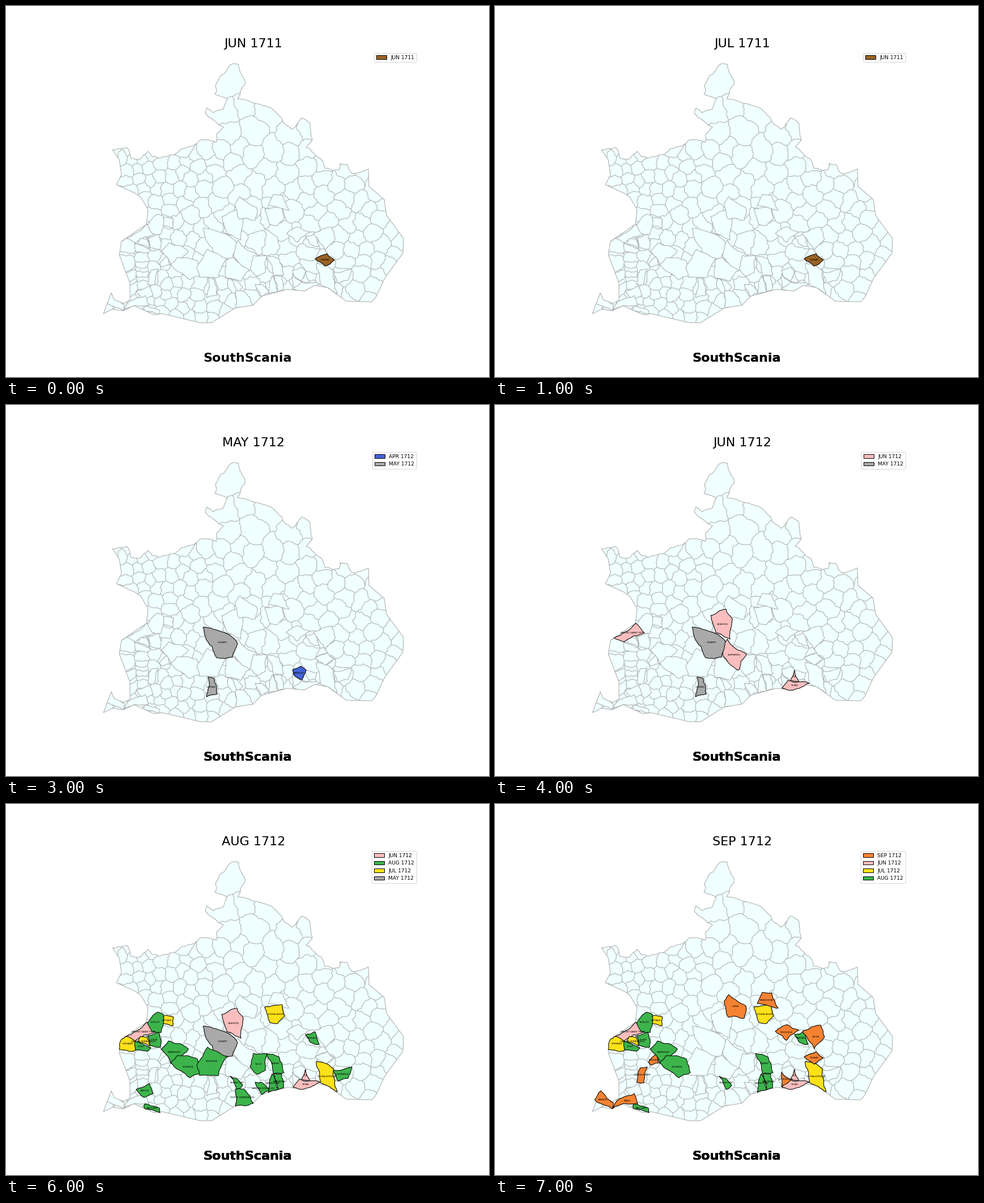
Write a matplotlib script that moves like this. It is 853 px wide and 656 px high and loops after 8 s.

```python
import math
import random
import matplotlib.pyplot as plt
from matplotlib.animation import FuncAnimation
from matplotlib.collections import LineCollection
from matplotlib.patches import Patch, Polygon

W, H, DPI = 853, 656, 128
PX = 72 / DPI  # one pixel in points
LAND, BORDER = "#f0ffff", "#a9a9a9"
COLORS = {"JUN 1711": "#9a6324", "APR 1712": "#4363d8", "MAY 1712": "#a9a9a9",
          "JUN 1712": "#fabebe", "JUL 1712": "#ffe119", "AUG 1712": "#3cb44b",
          "SEP 1712": "#f58231"}
# Title and legend months of every step
STEPS = [("JUN 1711", ["JUN 1711"]),
         ("JUL 1711", ["JUN 1711"]),
         ("APR 1712", ["APR 1712"]),
         ("MAY 1712", ["APR 1712", "MAY 1712"]),
         ("JUN 1712", ["JUN 1712", "MAY 1712"]),
         ("JUL 1712", ["JUN 1712", "JUL 1712", "MAY 1712"]),
         ("AUG 1712", ["JUN 1712", "AUG 1712", "JUL 1712", "MAY 1712"]),
         ("SEP 1712", ["SEP 1712", "JUN 1712", "JUL 1712", "AUG 1712"])]

plt.rcParams["font.family"] = "DejaVu Sans"
random.seed(17)

fig = plt.figure(figsize=(W / DPI, H / DPI), dpi=DPI, facecolor="white")
ax = fig.add_axes([0, 0, 1, 1])
ax.set_xlim(0, W)
ax.set_ylim(H, 0)
ax.axis("off")


def points(flat):
    return [complex(x, y) for x, y in zip(flat[::2], flat[1::2])]


def xy(path):
    return [(p.real, p.imag) for p in path]


def rough(a, b, amp):
    """Jagged path from a to b, without its start."""
    if abs(b - a) < 6:
        return [b]
    mid = (a + b) / 2 + 1j * (b - a) * random.uniform(-amp, amp)
    return rough(a, mid, amp) + rough(mid, b, amp)


def rough_path(path, amp):
    out = [path[0]]
    for a, b in zip(path, path[1:]):
        out += rough(a, b, amp)
    return out


def draw(path, fc, ec, z):
    return ax.add_patch(Polygon(xy(path), fc=fc, ec=ec, lw=PX, zorder=z))


# Province outline: jagged land border in the north, plain coast elsewhere
INLAND = [188, 254, 213, 250, 220, 269, 236, 271, 251, 257, 258, 266, 284, 266,
          311, 252, 341, 238, 371, 241, 372, 226, 384, 214, 364, 200, 352, 190,
          355, 180, 366, 189, 384, 182, 391, 165, 369, 156, 379, 123, 398, 103,
          411, 103, 422, 139, 409, 164, 435, 171, 465, 179, 490, 206, 505, 218,
          522, 198, 536, 206, 541, 237, 530, 250, 556, 270, 563, 287, 588, 290,
          590, 279, 602, 280, 611, 296, 640, 288]
COAST = [641, 319, 668, 342, 672, 370, 702, 411, 701, 437, 669, 481, 653, 515,
         646, 523, 601, 522, 568, 498, 545, 494, 527, 504, 497, 501, 452, 513,
         436, 529, 405, 534, 363, 560, 343, 560, 276, 544, 262, 546, 226, 530,
         207, 539, 188, 536, 172, 544, 186, 507, 191, 519, 208, 526, 219, 520,
         219, 490, 200, 440, 204, 416, 248, 386, 251, 360, 238, 338, 228, 331,
         195, 316, 204, 298, 200, 272]
outline = rough_path(points(INLAND), 0.12) + points(COAST)
land = draw(outline, LAND, "none", 0)
draw(outline, "none", BORDER, 3)

areas = []
grounds = []
sites = []


def inner_point(path):
    """Middle of the widest stretch at half the height."""
    ys = [p.imag for p in path]
    y = (min(ys) + max(ys)) / 2 + 0.01
    cuts = sorted(a.real + (b.real - a.real) * (y - a.imag) / (b.imag - a.imag)
                  for a, b in zip(path, path[1:] + path[:1])
                  if (a.imag < y) != (b.imag < y))
    left, right = max(zip(cuts[::2], cuts[1::2]), key=lambda c: c[1] - c[0])
    return complex((left + right) / 2, y)


def area(name, month, first, last, *corners):
    """A parish highlighted from the first to the last step."""
    path = points(corners)
    spot = inner_point(path)
    edge = rough_path(path + path[:1], 0.1)
    ground = draw(edge, LAND, BORDER, 2)
    ground.set_clip_path(land)
    grounds.append(ground)
    if spot not in sites:
        sites.append(spot)
    label = ax.text(spot.real, spot.imag, name, size=4.17 * PX,
                    ha="center", va="center", zorder=6)
    areas.append((first, last, draw(edge, COLORS[month], "black", 5), label))


OVRABY = [546, 447, 567, 438, 580, 449, 563, 460]
area("ÖVRABY", "JUN 1711", 0, 1, *OVRABY)
area("BJÄRESJÖ", "APR 1712", 2, 3, 506, 468, 521, 462, 530, 469, 523, 486, 508, 477)
area("GENARP", "MAY 1712", 3, 6, 348, 393, 394, 406, 409, 422, 400, 446, 372, 447,
     352, 410)
area("GRÖNBY", "MAY 1712", 3, 4, 357, 481, 367, 483, 373, 511, 354, 516)
area("MALMÖ SANKT PETRI", "JUN 1712", 4, 7, 210, 412, 248, 386, 263, 403, 228, 419)
area("VEBERÖD", "JUN 1712", 4, 6, 381, 372, 408, 361, 419, 378, 415, 414, 390, 402)
area("SLIMMINGE", "JUN 1712", 4, 4, 410, 414, 424, 430, 444, 440, 430, 469, 402, 442)
area("ÖJA", "JUN 1712", 4, 7, 529, 469, 537, 490, 522, 488)
area("YSTAD", "JUN 1712", 4, 7, 507, 501, 517, 487, 555, 492, 527, 504)
area("LIMHAMN", "JUL 1712", 5, 7, 200, 434, 204, 416, 211, 411, 228, 419, 228, 436)
area("VÄSTRA SKRÄVLINGE", "JUL 1712", 5, 7, 233, 421, 237, 411, 249, 412, 253, 428)
area("TOTTARP", "JUL 1712", 5, 7, 271, 384, 280, 374, 296, 377, 295, 392)
area("SÖDRA ÅSUM", "JUL 1712", 5, 7, 457, 359, 488, 355, 492, 375, 480, 388, 466, 386)
area("SKURUP", "JUL 1712", 5, 5, 389, 450, 402, 445, 429, 467, 415, 487, 390, 482)
area("STORA KÖPINGE", "JUL 1712", 5, 7, 548, 455, 578, 468, 585, 509, 556, 493)
area("BURLÖV", "AUG 1712", 6, 7, 250, 388, 268, 368, 278, 372, 274, 404, 258, 402)
area("HUSIE", "AUG 1712", 6, 7, 250, 410, 270, 404, 273, 430, 254, 427)
area("FOSIE", "AUG 1712", 6, 7, 227, 420, 256, 431, 250, 437, 229, 435)
area("SKABERSJÖ", "AUG 1712", 6, 7, 274, 433, 287, 419, 322, 433, 312, 444, 291, 459)
area("SVEDALA", "AUG 1712", 6, 7, 291, 457, 302, 445, 338, 451, 345, 475, 325, 484)
area("BÖRRINGE", "AUG 1712", 6, 6, 337, 462, 356, 430, 391, 446, 375, 480, 342, 480)
area("VILLIE", "AUG 1712", 6, 6, 431, 465, 437, 441, 462, 443, 458, 471, 444, 478)
area("SKÅRBY", "AUG 1712", 6, 7, 460, 441, 482, 447, 491, 475, 472, 477)
area("BALKÅKRA", "AUG 1712", 6, 7, 473, 477, 486, 477, 490, 502, 480, 505)
area("SNÅRESTAD", "AUG 1712", 6, 7, 470, 477, 480, 505, 463, 510)
area("VÄSTRA NÖBBELÖV", "AUG 1712", 6, 6, 440, 492, 451, 492, 465, 506, 452, 514)
area("SVENSTORP", "AUG 1712", 6, 7, 396, 481, 408, 486, 418, 497, 409, 505)
area("ÖSTRA VEMMENHÖG", "AUG 1712", 6, 6, 405, 504, 420, 504, 437, 529, 405, 534)
area("HÄSLÖV", "AUG 1712", 6, 6, 230, 505, 253, 494, 260, 512, 244, 519)
area("MAGLARP", "AUG 1712", 6, 7, 245, 530, 271, 538, 272, 546, 244, 538)
area("RAMSÅSA", "AUG 1712", 6, 7, 529, 408, 546, 403, 553, 425, 537, 421)
area("GLEMMINGE", "AUG 1712", 6, 6, 578, 471, 611, 465, 604, 485, 586, 490)
area("VOMB", "SEP 1712", 7, 7, 405, 348, 413, 337, 443, 357, 440, 379, 412, 377)
area("BRANDSTAD", "SEP 1712", 7, 7, 463, 353, 472, 333, 489, 334, 500, 361, 488, 358)
area("RÖDDINGE", "SEP 1712", 7, 7, 495, 402, 516, 390, 537, 400, 515, 418)
area("TRYDE", "SEP 1712", 7, 7, 543, 402, 575, 391, 582, 412, 564, 433)
area("ÖVRABY", "SEP 1712", 7, 7, *OVRABY)
area("HEDESKOGA", "SEP 1712", 7, 7, 506, 474, 522, 488, 506, 500)
area("TÖRRINGE", "SEP 1712", 7, 7, 271, 456, 284, 443, 289, 458, 275, 462)
area("SÖDRA ÅKARP", "SEP 1712", 7, 7, 256, 467, 269, 465, 263, 493, 250, 492)
area("SKANÖR", "SEP 1712", 7, 7, 176, 523, 187, 507, 209, 528, 207, 539)
area("RÄNG", "SEP 1712", 7, 7, 208, 538, 220, 521, 246, 512, 252, 530, 226, 530)


def spacing(x, y):
    """Parishes are large in the north and the middle, small in the west."""
    if y < 250:
        return 36
    middle = math.exp(-((x - 460) / 100) ** 2 - ((y - 350) / 110) ** 2)
    return 15.5 + 14 * middle + (5 if x > 540 else 0)


# Long narrow parishes along the south-west coast
for k in range(6):
    sites += [complex(212 + 2 * k, 443 + 10 * k), complex(242, 447 + 9 * k)]

for _ in range(12000):
    x, y = random.uniform(172, 703), random.uniform(101, 560)
    s = complex(x, y)
    if (land.get_path().contains_point((x, y))
            and all(abs(s - t) > spacing(x, y) for t in sites)
            and not any(g.get_path().contains_point((x, y)) for g in grounds)):
        sites.append(s)


def cell(i):
    """Voronoi cell as (corner, neighbour across the edge that starts there)."""
    s = sites[i]
    poly = [(c, -1) for c in (100 + 50j, 760 + 50j, 760 + 620j, 100 + 620j)]
    for j, t in enumerate(sites):
        if j == i:
            continue
        d = [abs(c - s) ** 2 - abs(c - t) ** 2 for c, _ in poly]
        if max(d) <= 0:
            continue
        out = []
        for k, (c, owner) in enumerate(poly):
            n = (k + 1) % len(poly)
            if d[k] <= 0:
                out.append((c, owner))
            if d[k] * d[n] < 0:
                cut = c + (poly[n][0] - c) * d[k] / (d[k] - d[n])
                out.append((cut, j if d[k] <= 0 else owner))
        poly = out
    return poly


borders = []
for i in range(len(sites)):
    poly = cell(i)
    for (a, owner), (b, _) in zip(poly, poly[1:] + poly[:1]):
        if owner > i:
            borders.append(xy(rough_path([a, b], 0.2)))
lines = LineCollection(borders, colors=BORDER, linewidths=PX, zorder=1)
ax.add_collection(lines, autolim=False)
lines.set_clip_path(land)

title = ax.text(437, 73.4, "", size=22.2 * PX, ha="center", va="baseline")
# The caption gains one more overprint with every step
captions = [ax.text(426.5, 629.2, "SouthScania", size=22.2 * PX, weight="bold",
                    ha="center", va="baseline") for _ in STEPS]


def update(step):
    name, months = STEPS[step]
    title.set_text(name)
    for k, text in enumerate(captions):
        text.set_visible(k <= step)
    for first, last, patch, label in areas:
        on = first <= step <= last
        patch.set_visible(on)
        label.set_visible(on)
    handles = [Patch(fc=COLORS[m], ec="black", lw=PX, label=m) for m in months]
    legend = ax.legend(handles=handles, loc="upper right", bbox_to_anchor=(725, 83),
                       bbox_transform=ax.transData, borderaxespad=0,
                       fontsize=9.13 * PX)
    legend.get_frame().set_linewidth(PX)
    return []


anim = FuncAnimation(fig, update, frames=len(STEPS), interval=1000, repeat=True)
plt.show()
```
